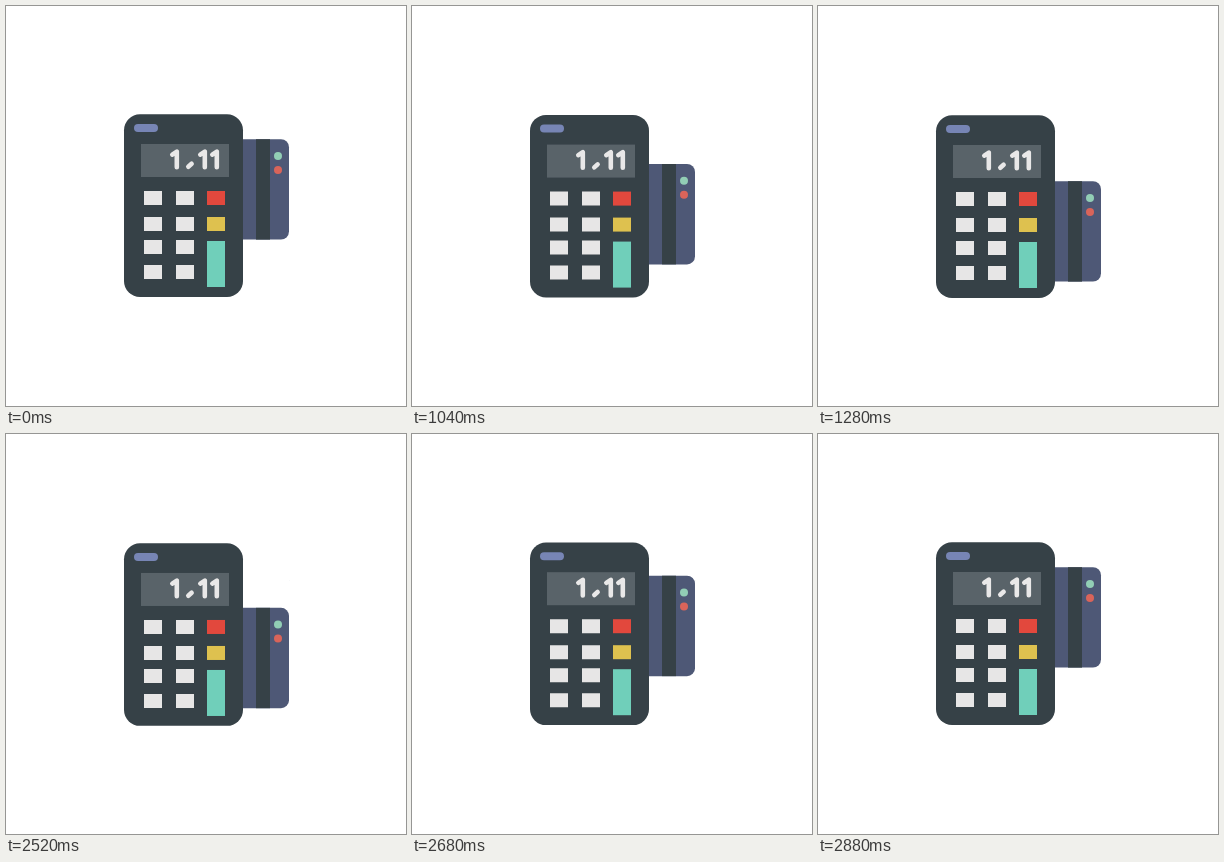
An HTML page for the animation above (4640 ms loop, 400 by 400 pixels).

```html
<!DOCTYPE html>
<html lang="en">
<head>
<meta charset="utf-8">
<title>Card terminal</title>
<style>
  html, body { margin: 0; height: 100%; overflow: hidden; background: #fff; }
  svg { display: block; width: 100%; height: 100%; }
</style>
</head>
<body>
<svg viewBox="0 0 400 400">
  <g id="card">
    <rect x="200" y="133.2" width="83" height="100.4" rx="8" fill="#4e5876"/>
    <rect x="250" y="133.2" width="14" height="100.4" fill="#364147"/>
    <circle cx="272" cy="150" r="4" fill="#92ceb5"/>
    <circle cx="272" cy="164" r="4" fill="#d9645a"/>
  </g>
  <g id="terminal">
    <rect x="118" y="108.3" width="119" height="182.6" rx="16" fill="#364147"/>
    <rect x="128" y="118" width="24" height="8" rx="4" fill="#7785b5"/>
    <rect x="135" y="138" width="88" height="33" fill="#596369"/>
    <g fill="none" stroke="#e9e8e8" stroke-width="4.6" stroke-linecap="round" stroke-linejoin="round">
      <path id="one" d="M166.3 148.6L170.8 145.6V161.2"/>
      <path d="M182.3 160.8L185.6 157.8"/>
      <use href="#one" x="28"/>
      <use href="#one" x="40"/>
    </g>
    <path fill="#e7e6e6" d="M138 185h18v14h-18zM170 185h18v14h-18z
      M138 211h18v14h-18zM170 211h18v14h-18z
      M138 234h18v14h-18zM170 234h18v14h-18z
      M138 259h18v14h-18zM170 259h18v14h-18z"/>
    <rect x="201" y="185" width="18" height="14" fill="#e2483d"/>
    <rect x="201" y="211" width="18" height="14" fill="#dec14f"/>
    <rect x="201" y="235" width="18" height="46" fill="#70cfba"/>
  </g>
</svg>
<script>
  const LOOP = 4640, STEP = 40, MOVE = 360;
  const card = document.getElementById('card');
  const terminal = document.getElementById('terminal');

  // cubic-bezier(.25, .1, .25, 1), solved by bisection
  function ease(p) {
    if (p <= 0) return 0;
    if (p >= 1) return 1;
    const curve = (a, b, u) => 3 * a * u * (1 - u) ** 2 + 3 * b * u * u * (1 - u) + u ** 3;
    let lo = 0, hi = 1;
    for (let i = 0; i < 24; i++) {
      const mid = (lo + hi) / 2;
      if (curve(.25, .25, mid) < p) lo = mid; else hi = mid;
    }
    return curve(.1, 1, lo);
  }

  function draw() {
    const t = Math.floor(performance.now() % LOOP / STEP) * STEP;
    const down = ease((t - 917) / MOVE) - ease((t - 2502) / MOVE);
    card.setAttribute('transform', `translate(0 ${42 * down})`);
    terminal.setAttribute('transform', `translate(0 ${down})`);
    requestAnimationFrame(draw);
  }
  draw();
</script>
</body>
</html>
```
